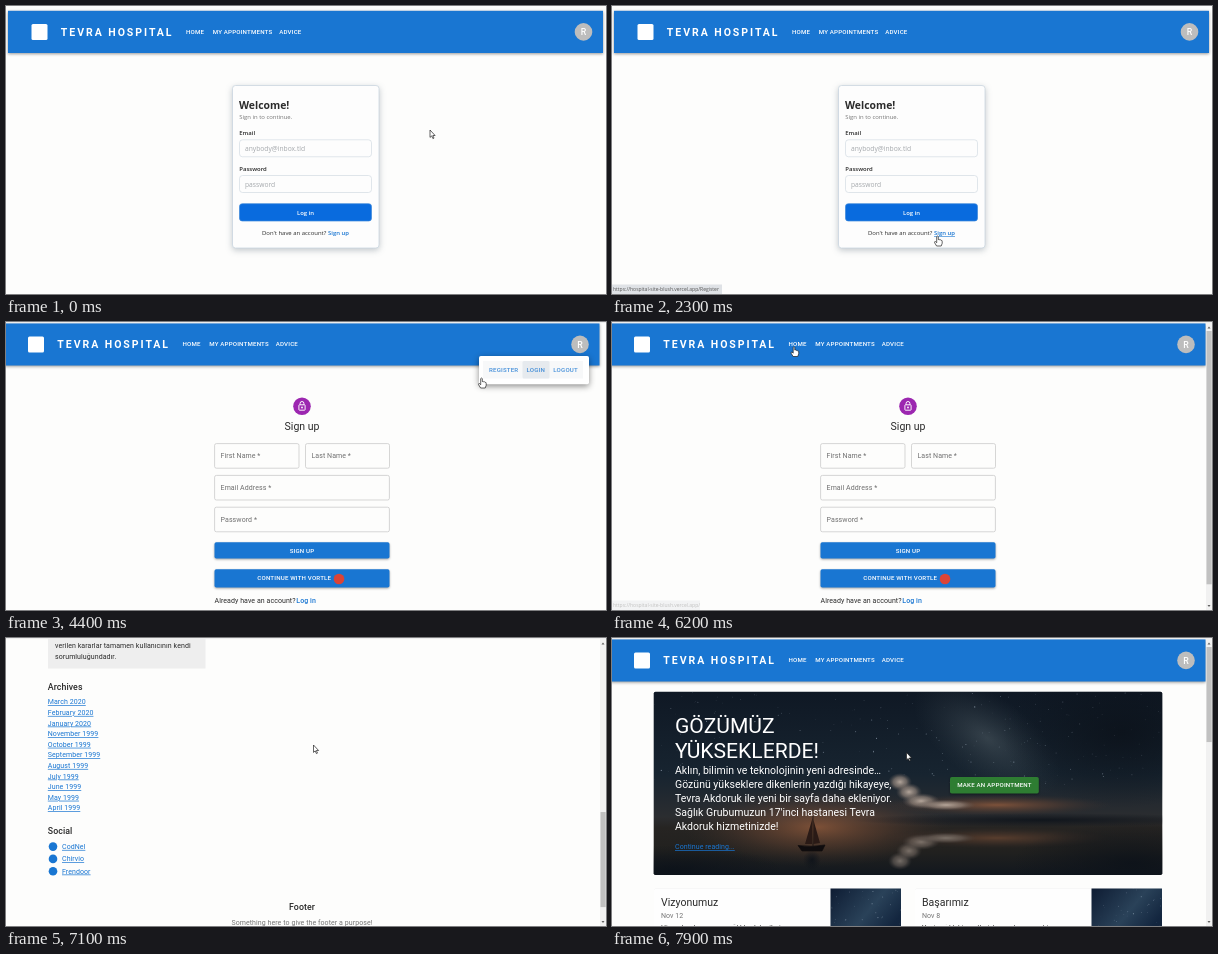
An HTML page that plays this animation: 600x288 px, repeating every 8 s.

```html
<!DOCTYPE html>
<html lang="en">
<head>
<meta charset="utf-8">
<title>Hospital site tour</title>
<style>
html, body { margin: 0; width: 100%; height: 100%; overflow: hidden; background: #fdfdfc; }
svg { display: block; width: 600px; height: 288px; }
text { font: 400 7.03px Roboto, sans-serif; letter-spacing: .00938em; fill: #2b2b2b; white-space: pre; }
.mid { text-anchor: middle; }
.btn { font-size: 6.15px; font-weight: 500; letter-spacing: .02857em; }
.white { fill: #fff; }
.blue { fill: #1976d2; }
.gray { fill: #757575; }
.h5 { font-size: 10.54px; letter-spacing: 0; }
.h6 { font-size: 8.8px; font-weight: 500; letter-spacing: .0075em; }
.brand { font-size: 10.54px; font-weight: 700; letter-spacing: 1.95px; }
.joy text, .status text { font-family: "Open Sans", "Noto Sans", sans-serif; font-size: 5.95px; letter-spacing: 0; }
.joy .title { font-size: 10.4px; font-weight: 700; }
.joy .bold { font-weight: 600; }
.joy .hint { font-size: 6.7px; fill: #a3a7ab; }
.joy .box { fill: #fdfdfd; stroke: #d3dbe2; stroke-width: .7; }
.field rect { fill: none; stroke: #c4c4c4; stroke-width: .7; }
.field text { fill: #707070; }
.link { fill: #1976d2; text-decoration: underline rgba(25,118,210,.5) .5px; }
.hero-title { font-size: 21.1px; letter-spacing: 0; }
.raised { filter: drop-shadow(0 1px .8px rgba(0,0,0,.35)); }
.bar { filter: drop-shadow(0 1.5px 1.5px rgba(0,0,0,.4)); }
.card { filter: drop-shadow(0 2px 3px rgba(40,60,80,.28)); }
.pop { filter: drop-shadow(0 2px 3px rgba(0,0,0,.45)); }
.paper { filter: drop-shadow(0 .4px .5px rgba(0,0,0,.1)); }
.status text { font-size: 5px; fill: #555; }
.status rect { fill: #dfe2e6; }
</style>
</head>
<body>
<svg viewBox="0 0 600 288">
  <defs>
    <linearGradient id="night" x2="0" y2="1">
      <stop offset="0" stop-color="#0f1824"/>
      <stop offset=".45" stop-color="#172430"/>
      <stop offset=".68" stop-color="#2b2d30"/>
      <stop offset=".74" stop-color="#262422"/>
      <stop offset=".86" stop-color="#22211f"/>
      <stop offset="1" stop-color="#11171e"/>
    </linearGradient>
    <linearGradient id="sky" x2="1" y2="1">
      <stop offset="0" stop-color="#0e1c33"/>
      <stop offset=".4" stop-color="#2a4259"/>
      <stop offset=".65" stop-color="#13263f"/>
      <stop offset="1" stop-color="#0e1c30"/>
    </linearGradient>
    <radialGradient id="warm">
      <stop offset="0" stop-color="#9a5f3e" stop-opacity=".75"/>
      <stop offset=".5" stop-color="#6b4633" stop-opacity=".45"/>
      <stop offset="1" stop-color="#3d302b" stop-opacity="0"/>
    </radialGradient>
    <radialGradient id="puff">
      <stop offset="0" stop-color="#c2b2a5" stop-opacity=".9"/>
      <stop offset=".55" stop-color="#94857b" stop-opacity=".65"/>
      <stop offset="1" stop-color="#5b5553" stop-opacity="0"/>
    </radialGradient>
    <radialGradient id="haze">
      <stop offset="0" stop-color="#56636a" stop-opacity=".5"/>
      <stop offset="1" stop-color="#3a474f" stop-opacity="0"/>
    </radialGradient>
    <radialGradient id="shade">
      <stop offset="0" stop-color="#0b1119" stop-opacity=".8"/>
      <stop offset="1" stop-color="#0b1119" stop-opacity="0"/>
    </radialGradient>
    <clipPath id="heroClip"><rect x="41.7" y="53.8" width="508.6" height="183.2" rx="1.8"/></clipPath>
  </defs>
  <rect width="600" height="288" fill="#fdfdfc"/>

  <g id="login" class="joy">
    <rect class="card" x="226.5" y="79.5" width="146.5" height="162.5" rx="3" fill="#fdfdfd" stroke="#cbd6e0" stroke-width=".8"/>
    <text class="title" x="233" y="102.5">Welcome!</text>
    <text class="gray" x="233.3" y="113">Sign in to continue.</text>
    <text class="bold" x="233.3" y="129.4">Email</text>
    <rect class="box" x="233.5" y="133.8" width="132" height="17" rx="3"/>
    <text class="hint" x="239" y="144.8">anybody@inbox.tld</text>
    <text class="bold" x="233.3" y="165">Password</text>
    <rect class="box" x="233.5" y="169.5" width="132" height="17" rx="3"/>
    <text class="hint" x="239" y="180.5">password</text>
    <rect x="233.5" y="197.7" width="132" height="17.3" rx="2.8" fill="#096bde" stroke="#3b87d8" stroke-width=".7"/>
    <text class="bold white mid" x="299.5" y="208.6">Log in</text>
    <text x="256" y="229.2">Don't have an account?</text>
    <text id="signLink" class="bold blue" x="322" y="229.2">Sign up</text>
  </g>

  <g id="register">
    <circle cx="296" cy="84.3" r="8.8" fill="#9c27b0"/>
    <g fill="none" stroke="#fff" stroke-width=".95">
      <rect x="292.9" y="82.8" width="6.2" height="5.4" rx=".6"/>
      <path d="M294.1 82.8v-1.4a1.9 1.9 0 0 1 3.8 0v1.4"/>
    </g>
    <circle cx="296" cy="85.5" r=".9" fill="#fff"/>
    <text class="h5 mid" x="296" y="107.6">Sign up</text>
    <g class="field">
      <rect x="208.6" y="121.6" width="84.4" height="24.6" rx="1.8"/>
      <rect x="299.5" y="121.6" width="84" height="24.6" rx="1.8"/>
      <rect x="208.6" y="153.4" width="174.8" height="24.6" rx="1.8"/>
      <rect x="208.6" y="185.2" width="174.8" height="24.6" rx="1.8"/>
      <text x="214.6" y="136.4">First Name *</text>
      <text x="305.5" y="136.4">Last Name *</text>
      <text x="214.6" y="168.2">Email Address *</text>
      <text x="214.6" y="200">Password *</text>
    </g>
    <rect class="raised" x="208.5" y="220.3" width="175" height="16.3" rx="1.8" fill="#1976d2"/>
    <text class="btn white mid" x="296" y="230.5">SIGN UP</text>
    <rect class="raised" x="208.5" y="247.2" width="175" height="18.4" rx="1.8" fill="#1976d2"/>
    <text class="btn white" x="251.3" y="258.4">CONTINUE WITH VORTLE</text>
    <circle cx="333" cy="257" r="5.3" fill="#db4437"/>
    <text x="208.5" y="280.5">Already have an account?</text>
    <text class="blue" x="290.3" y="280.5" style="font-weight:500">Log in</text>
  </g>

  <g id="home">
    <g clip-path="url(#heroClip)">
      <rect x="41" y="53" width="510" height="185" fill="url(#night)"/>
      <ellipse cx="375" cy="100" rx="85" ry="42" fill="url(#haze)" transform="rotate(35 375 100)"/>
      <g id="heroStars"></g>
      <ellipse cx="510" cy="95" rx="120" ry="75" fill="url(#shade)"/>
      <ellipse cx="205" cy="189" rx="135" ry="40" fill="url(#warm)"/>
      <g id="clouds">
        <ellipse cx="385" cy="167" rx="115" ry="11" fill="url(#warm)"/>
        <g fill="url(#puff)">
          <ellipse cx="288" cy="144" rx="12" ry="9"/>
          <ellipse cx="297" cy="154" rx="13" ry="9"/>
          <ellipse cx="309" cy="163" rx="19" ry="8"/>
          <ellipse cx="334" cy="167" rx="30" ry="5.5"/>
        </g>
      </g>
      <use href="#clouds" transform="translate(0 367) scale(1 -1)" opacity=".6"/>
      <ellipse cx="430" cy="182" rx="190" ry="7" fill="url(#shade)"/>
      <ellipse cx="520" cy="225" rx="120" ry="40" fill="url(#shade)"/>
      <ellipse cx="60" cy="232" rx="110" ry="25" fill="url(#shade)"/>
      <path d="M200.5 180L193 206H200ZM201.5 182L208 205 201.5 206Z" fill="#2a1a16"/>
      <path d="M201 178V208M186 207.5Q200 209.5 213 207L210 213H190Z" fill="#0f0c0e" stroke="#0f0c0e" stroke-width=".7"/>
      <ellipse cx="200" cy="222" rx="9" ry="10" fill="url(#shade)"/>
    </g>
    <text class="hero-title white" x="63" y="95.2">GÖZÜMÜZ</text>
    <text class="hero-title white" x="63" y="119.8">YÜKSEKLERDE!</text>
    <g id="heroText"></g>
    <text class="link" x="63" y="211">Continue reading...</text>
    <rect class="raised" x="338" y="139" width="88.8" height="16.5" rx="1.8" fill="#2e7d32"/>
    <text class="btn white mid" x="382.5" y="149.3">MAKE AN APPOINTMENT</text>
    <g id="posts"></g>
    <rect x="42" y="420" width="157.5" height="110.5" fill="#eee"/>
    <text class="h6" x="49" y="436">Hakkında</text>
    <g id="about"></g>
    <text class="h6" x="41.8" y="551.8">Archives</text>
    <g id="archive"></g>
    <text class="h6" x="41.8" y="696.2">Social</text>
    <g id="social"></g>
    <text class="h6 mid" x="296" y="771.6">Footer</text>
    <text class="mid gray" x="296" y="787">Something here to give the footer a purpose!</text>
  </g>

  <g id="header">
    <rect class="bar" x="-1.5" y="1.3" width="595" height="42.2" fill="#1976d2"/>
    <rect x="22" y="14.5" width="16" height="16" rx="1.5" fill="#fff"/>
    <text class="brand white" x="51.3" y="26.1">TEVRA HOSPITAL</text>
    <text class="btn white" x="176.5" y="24.4">HOME</text>
    <text class="btn white" x="203.2" y="24.4">MY APPOINTMENTS</text>
    <text class="btn white" x="269.7" y="24.4">ADVICE</text>
    <circle cx="574" cy="22.4" r="8.8" fill="#bdbdbd"/>
    <text class="h6 white mid" x="574" y="25.5">R</text>
  </g>

  <rect id="topLine" width="600" height="1.2" fill="#ededed"/>
  <g id="menu">
    <rect class="pop" x="473" y="34" width="110" height="28.3" rx="1.8" fill="#fff"/>
    <rect x="477" y="39" width="100" height="17.5" fill="#f7f8f9"/>
    <rect x="516.5" y="39" width="27" height="17.5" rx="1.5" fill="#e6eaee"/>
    <g opacity=".8">
      <text class="btn blue" x="483" y="49.8">REGISTER</text>
      <text class="btn blue" x="520.5" y="49.8">LOGIN</text>
      <text class="btn blue" x="547.3" y="49.8">LOGOUT</text>
    </g>
  </g>
  <g id="scrollbar">
    <rect x="594" y="1" width="6" height="287" fill="#f1f1f1"/>
    <path d="M595.5 6.5L597 4.5 598.5 6.5ZM595.5 283L597 285 598.5 283Z" fill="#606060"/>
    <rect id="thumb" x="594.5" width="5.2" fill="#c1c1c1"/>
  </g>
  <g id="status" class="status">
    <rect id="statusBox" y="278.5" height="9.5"/>
    <text id="statusText" x="1" y="285.2"></text>
  </g>
  <g id="cursor" stroke="#111" stroke-width=".65" stroke-linejoin="round" fill="#fff">
    <path id="arrow" d="M0 0V7.4L1.7 5.9 2.9 8.6 4 8.1 2.8 5.5H5.1Z"/>
    <path id="hand" d="M-.8 .6Q0-.5 .8 .6V3.6Q1.7 3 2.3 3.9 3.2 3.5 3.7 4.4 4.7 4.1 4.7 5.3V7.3L3.7 10H-.9L-2.9 6.7Q-3.2 5.3-1.9 5.6L-.8 6.7Z"/>
  </g>
</svg>
<script>
const LOOP = 8000, STEP = 100;
const $ = id => document.getElementById(id);
const line = (x, y, words, cls = '') => `<text class="${cls}" x="${x}" y="${y}">${words}</text>`;
const lines = (x, y, gap, list, cls) => list.map((s, i) => line(x, y + i * gap, s, cls)).join('');

let seed = 7;
const rand = () => (seed = seed * 16807 % 2147483647) / 2147483647;
const stars = (n, x, y, w, h) => Array.from({ length: n }, () =>
  `<circle cx="${x + rand() * w}" cy="${y + rand() * h}" r="${.2 + rand() * .35}" fill="#c6d5e6" opacity="${.2 + rand() * .5}"/>`).join('');

$('heroStars').innerHTML = stars(220, 42, 54, 508, 95);
$('heroText').innerHTML = lines(63, 135.8, 14.06, [
  'Aklın, bilimin ve teknolojinin yeni adresinde…',
  'Gözünü yükseklere dikenlerin yazdığı hikayeye,',
  'Tevra Akdoruk ile yeni bir sayfa daha ekleniyor.',
  "Sağlık Grubumuzun 17'inci hastanesi Tevra",
  'Akdoruk hizmetinizde!'], 'h5 white');

const post = (x, title, date, body) => `
  <rect class="paper" x="${x}" y="250.5" width="247" height="86" rx="1.8" fill="#fefefe"/>
  <rect x="${x + 176.5}" y="250.5" width="70.5" height="86" fill="url(#sky)"/>
  ${stars(60, x + 176.5, 250.5, 70.5, 86)}
  ${line(x + 7, 268.3, title, 'h5')}${line(x + 7, 280, date, 'gray')}
  ${lines(x + 7, 291.5, 10.55, body)}${line(x + 7, 328, 'Continue reading...', 'blue')}`;
$('posts').innerHTML =
  post(42, 'Vizyonumuz', 'Nov 12', ['Hizmet anlayışımızı sağlıkta daha ileriye', 'taşımak ve güven vermek.']) +
  post(303, 'Başarımız', 'Nov 8', ['Yeni sağlık hizmetleriyle sınırları aşan bir', 'ekibin başarısı.']);

$('about').innerHTML = lines(49, 446.9, 10.55, [
  'Bu sitede yer alan bilgiler yalnızca', 'bilgilendirme amacı taşır. Tanı ve',
  'tedavi için her zaman hekiminize', 'başvurunuz. İçerik hekim', 'muayenesinin yerini tutmaz.',
  'Sitedeki bilgilere dayanarak', 'verilen kararlar tamamen kullanıcının kendi', 'sorumluluğundadır.']);

$('archive').innerHTML = lines(41.8, 566.3, 10.6, [
  'March 2020', 'February 2020', 'January 2020', 'November 1999', 'October 1999', 'September 1999',
  'August 1999', 'July 1999', 'June 1999', 'May 1999', 'April 1999'], 'link');
$('social').innerHTML = lines(56, 710.9, 12.3, ['CodNel', 'Chirvio', 'Frendoor'], 'link') +
  [0, 1, 2].map(i => `<circle cx="47" cy="${708.6 + i * 12.3}" r="4.3" fill="#1976d2"/>`).join('');

// Cursor path: time, x, y of the tip.
const path = [
  [0, 424, 124], [200, 330, 70], [400, 72, 25], [600, 290, 28], [800, 450, 179], [1000, 522, 120],
  [1300, 330, 231], [1500, 400, 160], [1800, 570, 31], [1900, 568, 26], [2200, 326, 226],
  [2300, 325.5, 230], [2600, 325.5, 230], [3400, 440, 110], [3800, 574, 21], [4000, 570, 26],
  [4400, 475.5, 56], [4600, 300, 160], [4800, 12, 253], [5100, 586, 18], [5200, 586, 18],
  [5500, 430, 70], [6100, 182, 24], [6200, 182, 24.5], [6600, 256, 76], [7100, 307.5, 107],
  [7900, 294.5, 114.5]];
const scroll = [[6600, 0], [7100, 500], [7200, 530], [7300, 530], [7800, 0]];

function at(keys, t) {
  const i = keys.findIndex(k => k[0] > t);
  if (i < 0) return keys[keys.length - 1].slice(1);
  if (!i) return keys[0].slice(1);
  const a = keys[i - 1], b = keys[i], p = (t - a[0]) / (b[0] - a[0]);
  return a.slice(1).map((v, j) => v + (b[j + 1] - v) * p);
}
const show = (id, on) => $(id).style.display = on ? '' : 'none';
const within = (t, a, b) => t >= a && t < b;

const site = 'https://hospital-site-blush.vercel.app/';
function setStatus(t) {
  const s = within(t, 2200, 3500) ? [site + 'Register', 110, 1]
    : within(t, 6000, 6300) ? [site, 88, t < 6200 ? 1 : .35]
    : within(t, 6300, 6900) ? ['firebase.googleapis.com bekleniyor...', 198, 1] : null;
  show('status', s);
  if (!s) return;
  $('statusText').textContent = s[0];
  $('statusBox').setAttribute('width', s[1]);
  $('status').setAttribute('opacity', s[2]);
}

function draw(t) {
  const login = t < 2600, home = t >= 6300, menu = within(t, 3900, 5300);
  const [y] = at(scroll, t), [cx, cy] = at(path, t);
  show('login', login);
  show('register', !login && !home);
  show('home', home);
  show('topLine', !login);
  show('menu', menu);
  show('scrollbar', !login && !menu);
  $('home').setAttribute('transform', `translate(0 ${-y})`);
  $('header').setAttribute('transform', login ? 'translate(3.5 3.5)' : `translate(0 ${-y})`);
  const height = home ? 818 : 307, k = 270 / height;
  $('thumb').setAttribute('y', 9 + y * k);
  $('thumb').setAttribute('height', 288 * k);
  $('signLink').style.textDecoration = within(t, 2200, 2600) ? 'underline' : '';
  setStatus(t);
  const hand = within(t, 2200, 2800) || within(t, 3800, 4500) || within(t, 6000, 6300);
  show('hand', hand);
  show('arrow', !hand);
  $('cursor').setAttribute('transform', `translate(${cx} ${cy})`);
}

const start = performance.now();
function tick() {
  const t = (performance.now() - start + 1) % LOOP;
  draw(Math.floor(t / STEP) * STEP);
  requestAnimationFrame(tick);
}
tick();
</script>
</body>
</html>
```
